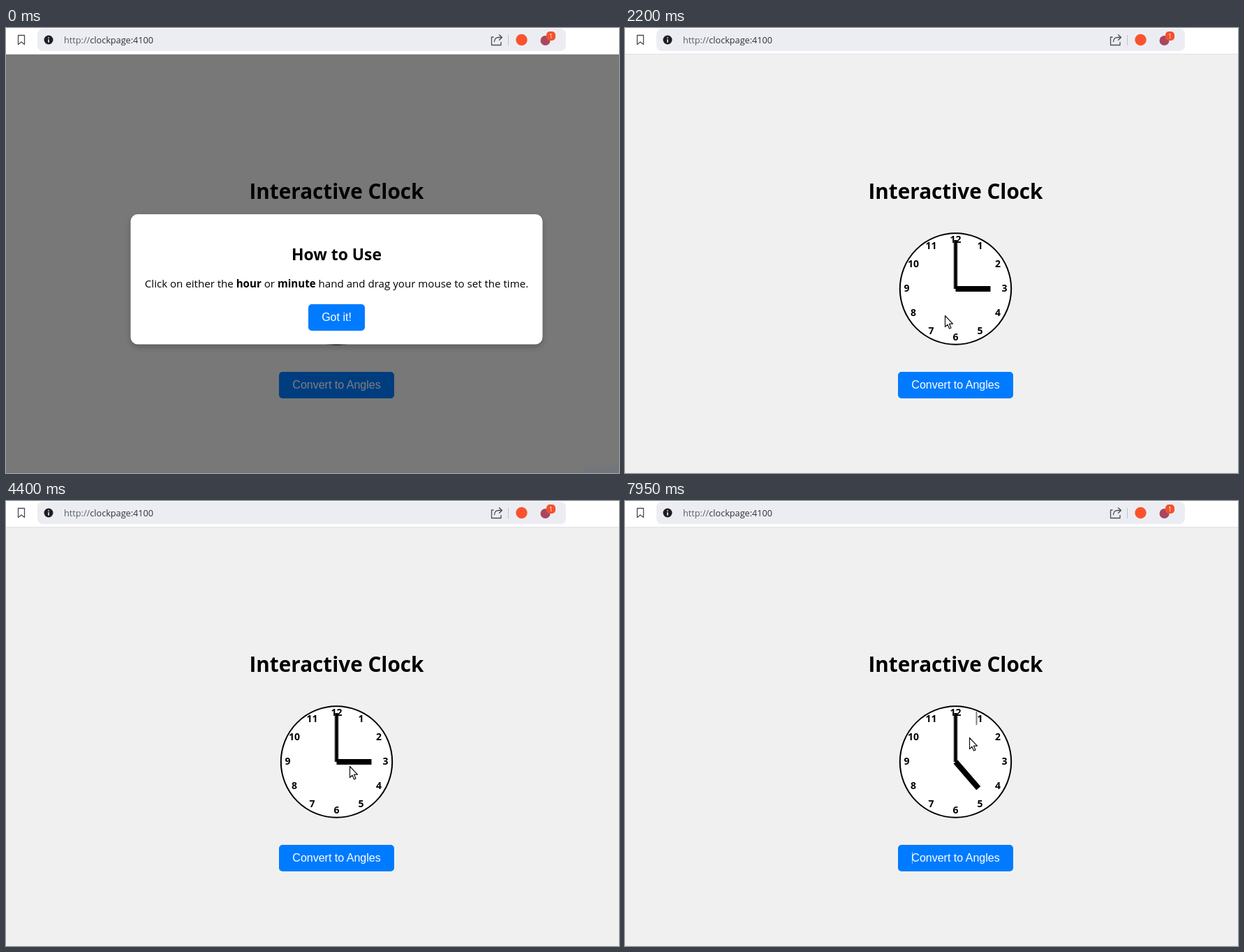
Recreate the animation shown at these times as an HTML page. Size 878 by 638 pixels, loop 8000 ms.

```html
<!DOCTYPE html>
<html lang="en">
<head>
<meta charset="utf-8">
<title>Interactive Clock</title>
<style>
html, body { margin: 0; width: 100%; height: 100%; overflow: hidden; background: #f0f0f0; }
svg { display: block; width: 100%; height: 100%; }
text { font-family: "Open Sans", "Noto Sans", sans-serif; }
.mid { text-anchor: middle; }
.bold { font-weight: 700; }
.label { font: 16px "Liberation Sans", Arial, sans-serif; fill: #fff; text-anchor: middle; }
.icon { fill: none; stroke: #4b4d55; stroke-width: 1.3; stroke-linejoin: round; stroke-linecap: round; }
.pointer { fill: #fff; stroke: #111; stroke-width: 1.2; stroke-linejoin: round; }
#modal { filter: drop-shadow(0 4px 4px rgba(0, 0, 0, .22)); }

#overlay, #status, #arrow, #finger, #buttonCaret, #faceCaret { animation: 8s step-end infinite; }
#cursor, #hour, #gotIt, #convert { animation: 8s linear infinite; }
#overlay { animation-name: overlay; }
#status { animation-name: status; }
#arrow { animation-name: arrow, arrowTint; }
#finger { animation-name: finger; }
#buttonCaret { animation-name: blink; }
#faceCaret { animation-name: faceCaret; }
#cursor { animation-name: travel; }
#hour { animation-name: drag; }
#gotIt { animation-name: hoverGotIt; }
#convert { animation-name: hoverConvert; }

@keyframes overlay { 0% { opacity: 1 } 27.5%, 100% { opacity: 0 } }
@keyframes status { 0% { opacity: 1 } 26.375%, 100% { opacity: 0 } }
@keyframes arrow { 0% { opacity: 0 } 6.625% { opacity: 1 } 57.5% { opacity: 0 } 70.75%, 100% { opacity: 1 } }
@keyframes arrowTint { 0% { stroke: #111 } 45% { stroke: #3f78d8 } 55%, 100% { stroke: #111 } }
@keyframes finger { 0% { opacity: 0 } 57.5% { opacity: 1 } 70.75%, 100% { opacity: 0 } }
@keyframes blink {
  0% { opacity: 0 } 61.5% { opacity: 1 } 68.125% { opacity: 0 }
  74.75% { opacity: 1 } 81.375% { opacity: 0 } 88%, 100% { opacity: 1 }
}
@keyframes faceCaret { 0% { opacity: 0 } 93.625%, 100% { opacity: 1 } }
@keyframes travel {
  0%, 6.625% { transform: translate(782px, 618px); animation-timing-function: ease-out }
  16.625%, 34.125% { transform: translate(458px, 412px); animation-timing-function: ease-in-out }
  41.875%, 45% { transform: translate(476px, 520px); animation-timing-function: ease-out }
  47.5% { transform: translate(484px, 407px) }
  52.375%, 57.4% { transform: translate(492px, 380px) }
  57.5%, 61.49% { transform: translate(499px, 378px) }
  61.5%, 62.36% { transform: translate(499px, 366px) }
  62.375%, 70.74% { transform: translate(499px, 378px) }
  70.75% { transform: translate(500px, 379px) }
  75%, 76.75% { transform: translate(503px, 372px) }
  84.375% { transform: translate(509px, 353px) }
  86.125%, 87% { transform: translate(509px, 349px) }
  88.5%, 97.625% { transform: translate(508px, 345px) }
  99.375%, 100% { transform: translate(493px, 339px) }
}
@keyframes drag {
  0%, 70.74% { transform: rotate(90deg) }
  70.75% { transform: rotate(192deg) }
  75%, 76.75% { transform: rotate(177deg) }
  84.375% { transform: rotate(151deg) }
  86.125%, 87% { transform: rotate(145deg) }
  88.5%, 100% { transform: rotate(139deg) }
}
@keyframes hoverGotIt { 0%, 15.5% { fill: #007bff } 19.25%, 100% { fill: #0056b3 } }
@keyframes hoverConvert {
  0%, 38.125% { fill: #007bff } 41.875%, 45% { fill: #0056b3 } 48.75%, 100% { fill: #007bff }
}
</style>
</head>
<body>
<svg viewBox="0 0 878 638">
  <rect width="878" height="638" fill="#f0f0f0"/>

  <g id="toolbar">
    <rect width="878" height="38" fill="#fff"/>
    <rect y="37" width="878" height="1" fill="#e2e2e4"/>
    <rect x="45" y="1" width="757" height="32" rx="8" fill="#ecedf2"/>
    <path class="icon" d="M17.5 10.5h9v13l-4.5-3.5l-4.5 3.5z"/>
    <circle cx="61" cy="17" r="6.5" fill="#1d1e22"/>
    <path d="M61 13.2v1.6M61 16.2v4.6" stroke="#fff" stroke-width="1.5"/>
    <text x="83" y="21.5" font-size="12.7" fill="#30323a"><tspan fill="#5b5e68">http://</tspan>clockpage:4100</text>
    <path class="icon" d="M698 13h-2.5v11.5h13.5v-4M699.5 19.5q.5-6 6-6h4.5M706.5 9.7l4 3.8l-4 3.8"/>
    <path d="M719.5 10v15" stroke="#c3c5cc"/>
    <circle cx="738.5" cy="17" r="8.2" fill="#f9532d"/>
    <circle cx="772.5" cy="18" r="7" fill="#a8475f"/>
    <rect x="774" y="5" width="13" height="13" rx="5" fill="#f4512c"/>
    <text class="mid" x="780.5" y="14.5" font-size="9" fill="#fff">1</text>
  </g>

  <text class="mid bold" x="473.5" y="245" font-size="29.7">Interactive Clock</text>

  <g id="clock" transform="translate(473.5 374)">
    <circle r="79.7" fill="#fff" stroke="#000" stroke-width="2"/>
    <g id="numerals" class="mid bold" font-size="14"></g>
    <path id="hour" d="M0 0V-50" stroke="#000" stroke-width="8"/>
    <path id="minute" d="M0 0V-70" stroke="#000" stroke-width="5"/>
    <path id="faceCaret" d="M30 -72v19" stroke="#000"/>
  </g>

  <rect id="convert" x="391" y="493" width="165" height="38" rx="5" fill="#007bff"/>
  <text class="label" x="473.5" y="517">Convert to Angles</text>
  <path id="buttonCaret" d="M411.5 503v17" stroke="#fff" stroke-opacity=".6"/>

  <g id="overlay">
    <rect y="38" width="878" height="600" opacity=".5"/>
    <rect id="status" x="828" y="627" width="50" height="11" fill="#73767a"/>
    <rect id="modal" x="178.5" y="267" width="590" height="186.5" rx="10" fill="#fff"/>
    <text class="mid bold" x="473.5" y="333" font-size="22.9">How to Use</text>
    <text class="mid" x="473.5" y="372" font-size="15.1">Click on either the <tspan class="bold">hour</tspan> or <tspan class="bold">minute</tspan> hand and drag your mouse to set the time.</text>
    <rect id="gotIt" x="433" y="396" width="81" height="38" rx="5" fill="#007bff"/>
    <text class="label" x="473.5" y="420">Got it!</text>
  </g>

  <g id="cursor">
    <path id="arrow" class="pointer" d="M.5 .5V16.5L4 13.2L6.6 19L9 18L6.5 12.2H11.5Z"/>
    <g id="finger" class="pointer">
      <path d="M-1.2 14V2.3a1.8 1.8 0 0 1 3.6 0V8q2.4-.8 2.9.9q2-.6 2.6 1q2.3-.3 2.5 1.9V16q0 3-1.7 5v2.5H.5V21.5L-5 14.5q-.8-2 .9-2.3q1.2 0 2.9 1.8z"/>
      <path d="M2.4 8v4.5M5.3 9v3.7M7.9 10v3" fill="none"/>
    </g>
  </g>
</svg>
<script>
const numerals = document.getElementById("numerals");
for (let n = 1; n <= 12; n++) {
  const angle = n * Math.PI / 6;
  const label = document.createElementNS("http://www.w3.org/2000/svg", "text");
  label.setAttribute("x", 70 * Math.sin(angle));
  label.setAttribute("y", 4 - 70 * Math.cos(angle));
  label.textContent = n;
  numerals.append(label);
}
</script>
</body>
</html>
```
